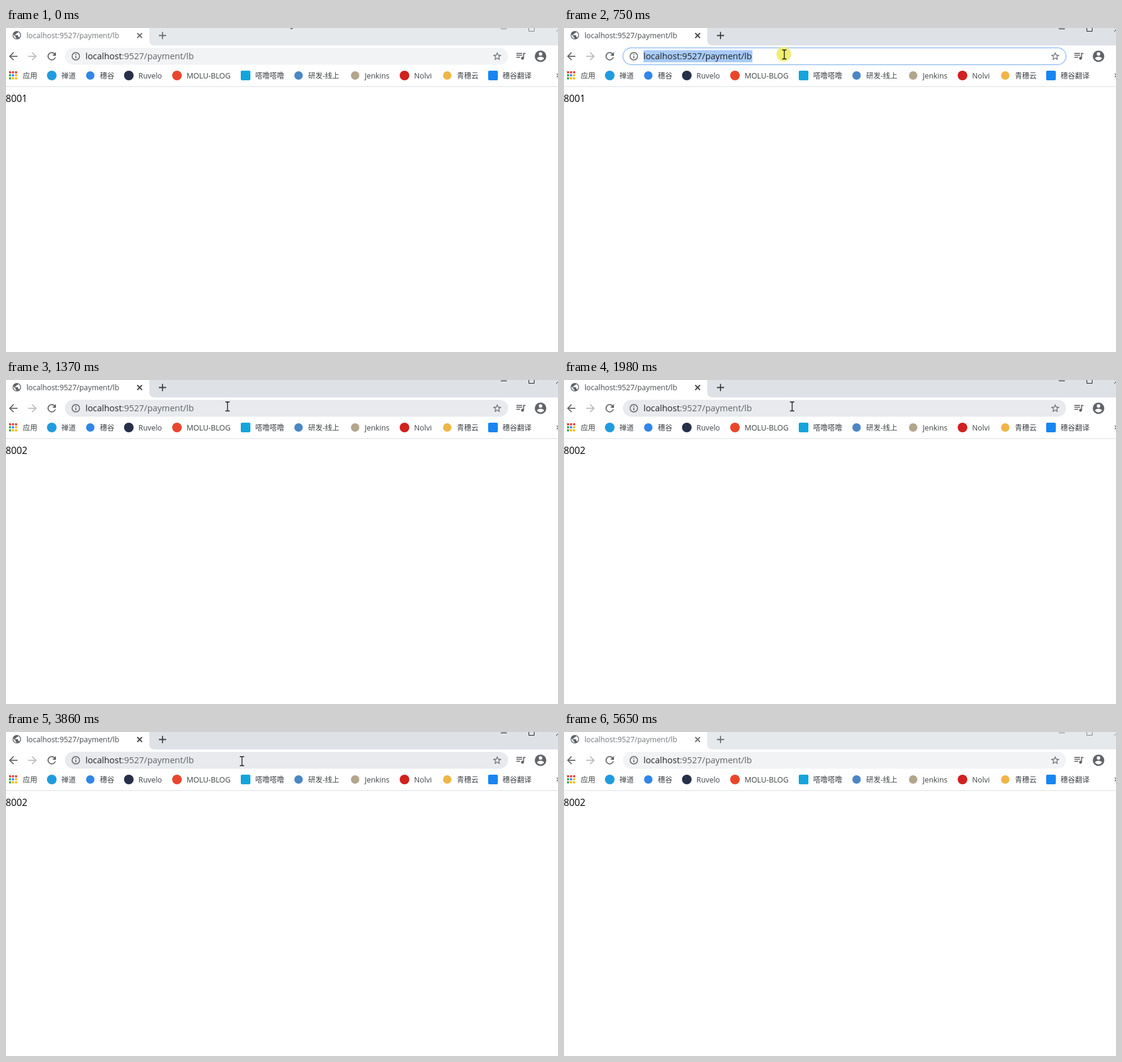
These frames come from a looping animation (917 px wide and 539 px high, 5730 ms). An HTML page:

```html
<!DOCTYPE html>
<html lang="zh">
<head>
<meta charset="utf-8">
<style>
html, body { margin: 0; width: 100%; height: 100%; overflow: hidden; background: #fff; }
svg { display: block; width: 917px; height: 539px; }
text { font-family: "Open Sans", "Noto Sans CJK SC", "Noto Sans CJK", sans-serif; white-space: pre; }
.line { fill: none; stroke: #5f6368; stroke-width: 2; }
#frame { fill: #e6e9ec; }
#title { fill: #73767a; }
.mark { fill: none; stroke: #6b6e72; stroke-width: 1.8; }
.win { fill: none; stroke: #85888b; }
.active #frame { fill: #dee1e6; }
.active #title { fill: #45484c; }
.active .mark { stroke: #3c4043; }
.active .win { stroke: #222; }
#box { fill: #f1f3f4; }
.hover #box { fill: #e8eaed; }
#focus, .loading #globe, .loading #reload, #spinner, #stop { display: none; }
.focused #focus, .loading #spinner, .loading #stop { display: inline; }
.focused #box { fill: #fff; }
#path { fill: #5f6368; }
.focused #path { fill: #202124; }
</style>
</head>
<body>
<svg id="stage" viewBox="0 0 917 539">
  <rect id="frame" width="917" height="29"/>
  <path d="M0 0H238V20Q238 29 247 29H0Z" fill="#fff"/>
  <g id="globe"></g>
  <path id="spinner" class="line" d="M18 6A6 6 0 1 0 24 12"/>
  <text id="title" x="34" y="17" font-size="12.35">localhost:9527/payment/lb</text>
  <path class="mark" d="M218 8.500l8 8m0 -8l-8 8M254 12.500h12m-6 -6v12"/>
  <path class="win" d="M822 1.500h10M868.500 0V5.500H877.500V0M914 6l6-6"/>

  <g id="toolbar"></g>
  <g id="reload"></g>
  <path id="stop" class="line" d="M71 42l10 10m0-10l-10 10"/>
  <rect id="box" x="98" y="33" width="736" height="28" rx="14"/>
  <g id="focus">
    <rect x="98" y="33" width="736" height="28" rx="14" fill="none" stroke="#b1d0f8" stroke-width="2"/>
    <rect x="132" y="37" width="181" height="20" fill="#a8cbf8"/>
  </g>
  <circle class="line" cx="116" cy="47" r="6.200" style="stroke-width:1.5"/>
  <path class="line" d="M116 43.200v1.700M116 46.200v4.300" style="stroke-width:1.6"/>
  <text x="132" y="52" font-size="14.44" fill="#202124">localhost<tspan id="path">:9527/payment/lb</tspan></text>
  <g id="star"></g>

  <g id="apps"></g>
  <g id="bookmarks" fill="#3c4043"></g>
  <path class="line" d="M915 76l3 3l-3 3" style="stroke-width:1.3"/>
  <path d="M0 97.500H917" stroke="#dcdee1"/>

  <text id="port" x="-0.5" y="123" font-size="15.8" fill="#000"></text>

  <circle id="halo" cx="365" cy="43.500" r="12" fill="#f0ec60" opacity=".9"/>
  <path id="beam" d="M-3.500 -7.500H-1L0 -6.500L1 -7.500H3.500M0 -7V7M-3.500 7.500H-1L0 6.500L1 7.500H3.500" fill="none" stroke="#111" stroke-width="1.3"/>
  <path id="arrow" d="M.5 .5V16.500L4 13.200L6.700 18.700L9.300 17.500L6.700 12H11.500Z" fill="#fff" stroke="#1c1c2c"/>
</svg>
<script>
const LOOP = 5730;
const $ = id => document.getElementById(id);
const GREY = '#5f6368';

// Icon paths use a 24-unit grid, centred on (x, y).
const icon = (d, x, y, size, fill = GREY, turn = 0) =>
  `<path d="${d}" fill="${fill}" fill-rule="evenodd" transform="translate(${x} ${y}) rotate(${turn}) scale(${size / 24}) translate(-12 -12)"/>`;

const BACK = 'M20 11H7.83l5.59-5.59L12 4l-8 8 8 8 1.41-1.41L7.83 13H20z';
const RELOAD = 'M17.65 6.35A8 8 0 1 0 19.73 14h-2.08A6 6 0 1 1 16.22 7.78L13 11h7V4z';
const STAR = 'M22 9.24l-7.19-.62L12 2 9.19 8.63 2 9.24l5.46 4.73L5.82 21 12 17.27 18.18 21l-1.63-7.03zM12 15.4l-3.76 2.27 1-4.28-3.32-2.88 4.38-.38L12 6.1l1.71 4.04 4.38.38-3.32 2.88 1 4.28z';
const QUEUE = 'M15 6H3v2h12zM15 10H3v2h12zM3 16h8v-2H3zM17 6v8.18A3 3 0 1 0 19 17V8h3V6z';
const USER = 'M12 2a10 10 0 1 0 0 20a10 10 0 1 0 0-20zM12 5a3 3 0 1 1 0 6a3 3 0 1 1 0-6zM12 19.2c-2.5 0-4.71-1.28-6-3.22.03-1.99 4-3.08 6-3.08 1.99 0 5.97 1.09 6 3.08-1.29 1.94-3.5 3.22-6 3.22z';
const GLOBE = 'M12 2a10 10 0 1 0 0 20a10 10 0 1 0 0-20zM11 19.93c-3.95-.49-7-3.85-7-7.93 0-.62.08-1.21.21-1.79L9 15v1c0 1.1.9 2 2 2zM17.9 17.39c-.26-.81-1-1.39-1.9-1.39h-1v-3c0-.55-.45-1-1-1H8v-2h2c.55 0 1-.45 1-1V7h2c1.1 0 2-.9 2-2v-.41c2.93 1.19 5 4.06 5 7.41 0 2.08-.8 3.97-2.1 5.39z';

$('globe').innerHTML = icon(GLOBE, 18, 12, 17);
$('reload').innerHTML = icon(RELOAD, 76, 47, 21);
$('star').innerHTML = icon(STAR, 816, 47, 17);
$('toolbar').innerHTML = icon(BACK, 12, 47, 21) + icon(BACK, 44, 47, 21, '#babcbe', 180) +
  icon(QUEUE, 855, 46.3, 19) + icon(USER, 888, 47, 23);

const [R, G, B, Y] = ['#ea4335', '#34a853', '#4285f4', '#fbbc05'];
$('apps').innerHTML = [R, R, R, G, B, Y, G, Y, Y].map((c, i) =>
  `<rect x="${5 + i % 3 * 5}" y="${72 + Math.floor(i / 3) * 5}" width="3.500" height="3.500" fill="${c}"/>`).join('');

// Bookmark: text x, label, badge colour, badge corner radius
const bookmarks = [
  [28, '应用'],
  [92, '禅道', '#1f9be0', 8],
  [156, '穗谷', '#2f86e8', 7],
  [220, 'Ruvelo', '#26304a', 8],
  [300, 'MOLU-BLOG', '#e8472b', 8],
  [414, '嗒噜嗒噜', '#12a5dc', 2],
  [502, '研发-线上', '#4a86c8', 7],
  [596, 'Jenkins', '#b3a68c', 7],
  [678, 'Nolvi', '#d0211f', 8],
  [749, '青穗云', '#f0b548', 7],
  [825, '穗谷翻译', '#1885f0', 2]
];
$('bookmarks').innerHTML = bookmarks.map(([x, label, color, r]) => {
  const half = r === 7 ? 7 : 8;
  const badge = color ? `<rect x="${x - 16 - half}" y="${79 - half}" width="${half * 2}" height="${half * 2}" rx="${r}" fill="${color}"/>` : '';
  const size = /^[\w-]+$/.test(label) ? 12.4 : 12;
  return `${badge}<text x="${x}" y="84" font-size="${size}">${label}</text>`;
}).join('');

// Pointer hot spot: time, x, y
const pointer = [
  [0, 467, -17], [70, -99, -99], [280, 440, -6], [360, 405, 12], [440, 382, 36],
  [510, 370, 42], [590, 366, 44], [1060, 368, 44], [1910, 374, 44], [1980, 379, 44],
  [2060, 383, 45], [2290, 388, 46], [2920, 392, 48.5], [4240, 397, 56], [4320, 404, 66],
  [4400, 414, 80], [4480, 424, 92], [4560, 432, 101], [4650, 500, 170], [4720, 660, 310],
  [4790, 793, 431], [4870, 775, 465], [4950, 757, 498], [5020, 742, 525], [5100, -99, -99]
];
const switches = [1300, 1600, 1830, 2220, 2520, 2670, 2920, 3220, 3390, 3620, 3860, 4090, 4240];
const loads = [1220, 1520, 1750, 2140, 2440];

const show = (id, on) => { $(id).style.display = on ? 'inline' : 'none'; };
const during = (t, from, to) => t >= from && t < to;

function draw(t) {
  const [, x, y] = pointer.filter(p => p[0] <= t).pop();
  const hover = y > 32 && y < 62;
  const state = {
    active: during(t, 750, 5650),
    focused: during(t, 750, 1220),
    loading: loads.some(s => during(t, s, s + 80)),
    hover
  };
  for (const name in state) $('stage').classList.toggle(name, state[name]);
  $('port').textContent = 8001 + switches.filter(s => s <= t).length % 2;
  show('halo', during(t, 670, 820));
  show('beam', hover);
  show('arrow', !hover);
  $(hover ? 'beam' : 'arrow').setAttribute('transform', `translate(${x} ${y})`);
}

const start = performance.now();
function tick() {
  draw((performance.now() - start) % LOOP);
  requestAnimationFrame(tick);
}
tick();
</script>
</body>
</html>
```
